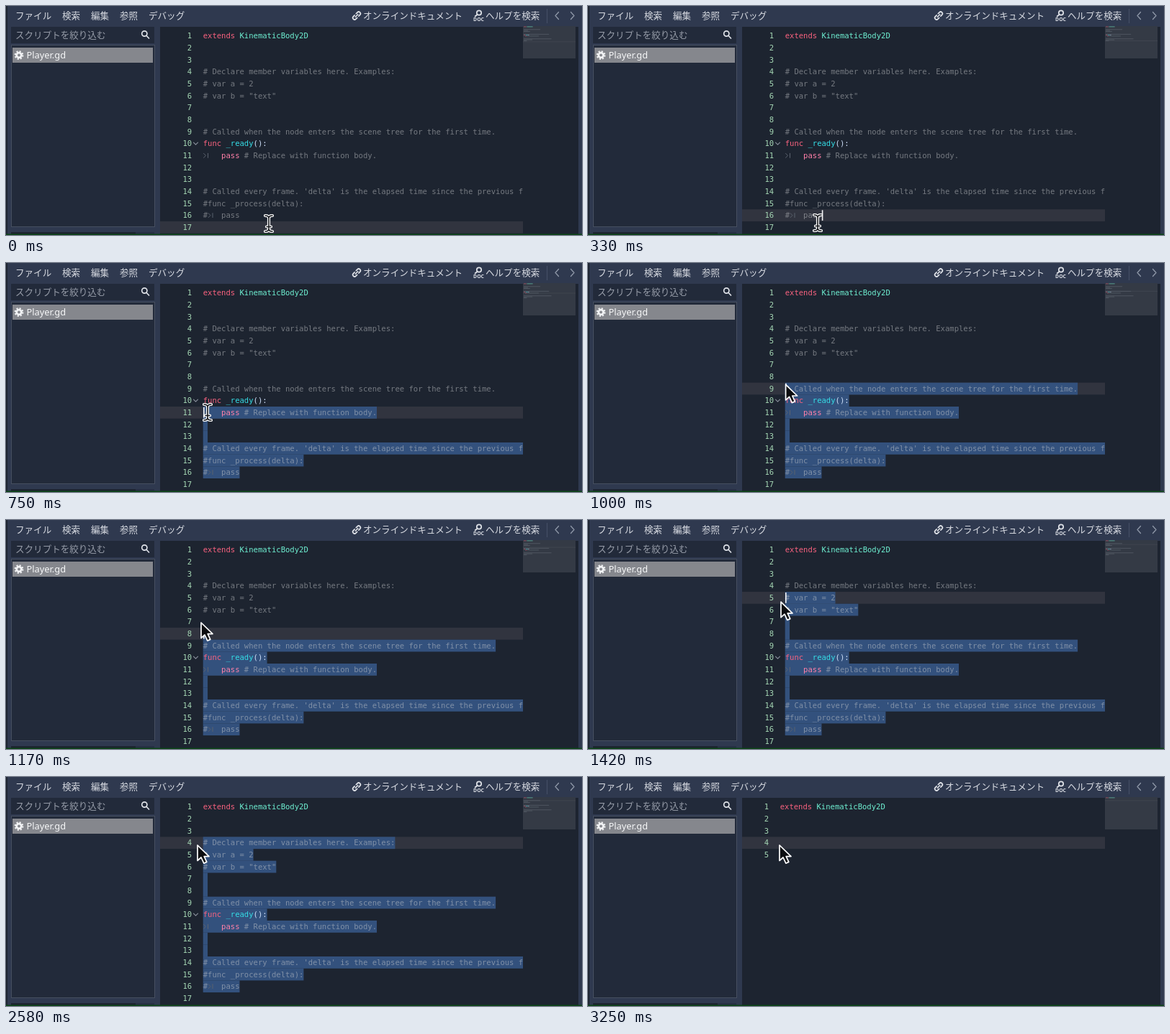
Write an HTML page that moves like this. It is 800x319 px and loops after 3550 ms.

```html
<!DOCTYPE html>
<html lang="ja">
<head>
<meta charset="utf-8">
<title>Script editor</title>
<style>
  html, body { margin: 0; width: 100%; height: 100%; overflow: hidden; background: #2f394f; }
  svg { display: block; width: 800px; height: 319px; }
  .ui { font: 12.55px "Noto Sans CJK JP", "Noto Sans CJK", "Noto Sans", sans-serif; fill: #d9dce3; }
  .code { font: 10.55px "DejaVu Sans Mono", monospace; white-space: pre; }
  .num { fill: #a5d7b4; text-anchor: end; }
  .key { fill: #f9627f; }
  .flow { fill: #ff80a8; }
  .type { fill: #6ff0d2; }
  .fn { fill: #35dde6; }
  .sym { fill: #cfe0fa; }
  .note { fill: rgba(205, 207, 210, .5); }
  .icon { fill: none; stroke: #dfe2e8; stroke-width: 1.7; stroke-linecap: round; stroke-linejoin: round; }
  .icon.nav { stroke: #8f98a8; stroke-width: 1.3; }
  .icon.fold { stroke: #868d99; stroke-width: 1.2; }
  .icon.tab { stroke: #5b626e; stroke-width: 1; }
</style>
</head>
<body>
<svg viewBox="0 0 800 319">
  <defs>
    <clipPath id="view"><rect x="214" y="29" width="504" height="289"/></clipPath>
    <path id="beamLine" d="M-5 -12Q0 -12 0 -8.5Q0 -12 5 -12M0 -8.5V6.5M-5 10Q0 10 0 6.5Q0 10 5 10M-3 3.5H3"/>
  </defs>
  <rect width="800" height="319" fill="#2f394f"/>
  <rect width="2" height="319" fill="#1d2430"/>

  <g class="ui">
    <text x="13" y="18">ファイル</text>
    <text x="78" y="18">検索</text>
    <text x="118" y="18">編集</text>
    <text x="158" y="18">参照</text>
    <text x="198" y="18">デバッグ</text>
    <text x="496" y="18">オンラインドキュメント</text>
    <text x="666" y="18">ヘルプを検索</text>
  </g>
  <path class="icon" transform="rotate(-45 487 13.5)"
    d="M485.5 11H483a2.5 2.5 0 0 0 0 5h2.5M488.5 11h2.5a2.5 2.5 0 0 1 0 5h-2.5M484.5 13.5h5"/>
  <g class="icon"><circle cx="657" cy="9.5" r="3.2"/><path d="M654.5 12l-3 2.5"/></g>
  <text x="656.5" y="21" text-anchor="middle" fill="#dfe2e8" font-family="Noto Sans, sans-serif" font-size="6.8" font-weight="800">DOC</text>
  <path class="icon nav" d="M767.5 8.5l-4.5 5 4.5 5M784.5 8.5l4.5 5-4.5 5"/>
  <path d="M751.5 4v20" stroke="#465067"/>

  <rect x="7" y="29" width="199" height="23" fill="#222a3a"/>
  <text class="ui" x="13" y="44.5" style="fill:#979da9">スクリプトを絞り込む</text>
  <g class="icon"><circle cx="192.3" cy="38.5" r="3.6"/><path d="M195.2 41.5l3.3 3.5"/></g>
  <rect x="7.5" y="54.5" width="199" height="253" fill="#222a3a" stroke="#464f60"/>
  <rect x="9" y="58" width="195" height="21" fill="#85878d"/>
  <g transform="translate(18 68.5)" fill="none" stroke="#f2f3f5">
    <circle r="3.3" stroke-width="2.8"/>
    <circle r="5.3" stroke-width="2.2" stroke-dasharray="2.1 2.062"/>
  </g>
  <text x="28.5" y="72.6" fill="#f6f7f8" font-family="Noto Sans, sans-serif" font-size="12.85">Player.gd</text>
  <rect x="7" y="315" width="173" height="3" fill="#1d2430"/>
  <rect x="180" y="315" width="26" height="3" fill="#273044"/>

  <rect x="214" y="29" width="581" height="289" fill="#1d2430"/>
  <g id="editor" clip-path="url(#view)"></g>
  <rect x="718" y="28" width="73" height="45" fill="#343a45"/>
  <g id="map"></g>
  <rect y="317.5" width="800" height="1.5" fill="#0b4516"/>

  <g id="beam" fill="none" stroke-linecap="round" stroke-linejoin="round">
    <use href="#beamLine" stroke="#fff" stroke-width="4.2"/>
    <use href="#beamLine" stroke="#15171c" stroke-width="1.6"/>
  </g>
  <path id="arrow" d="M0 0V21.5L5 17L8.8 25.2L12.8 23.4L9.2 15.6H16Z" fill="#0c0d10" stroke="#fff" stroke-width="1.7" stroke-linejoin="round"/>
</svg>
<script>
const LOOP = 3550, TICK = 1000 / 12;
const CHAR = 6.35, ROW = 16.66, TOP = 33.4;
const DELETE_AT = 33, POINT_AT = 12;
const ANCHOR = { row: 16, col: 8 };
const $ = id => document.getElementById(id);

// Each line is a list of [class, text] runs.
const note = text => [["note", text]];
const before = [
  [["key", "extends "], ["type", "KinematicBody2D"]], [], [],
  note("# Declare member variables here. Examples:"),
  note("# var a = 2"),
  note('# var b = "text"'), [], [],
  note("# Called when the node enters the scene tree for the first time."),
  [["key", "func "], ["fn", "_ready"], ["sym", "():"]],
  [["flow", "    pass "], ["note", "# Replace with function body."]], [], [],
  note("# Called every frame. 'delta' is the elapsed time since the previous f"),
  note("#func _process(delta):"),
  note("#   pass"), []
];
const after = before.slice(0, 3).concat([[], []]);
const length = line => line.reduce((n, run) => n + run[1].length, 0);

// tick, x, y
const mouse = [[0, 365, 304], [4, 319, 303], [5, 317, 299], [9, 280, 209], [14, 271, 143], [19, 266, 95]];
// tick, row, column
const carets = [[0, 17, 0], [3, 16, 8], [6, 15, 5], [7, 14, 3], [8, 12, 0], [9, 11, 0], [11, 10, 0],
  [12, 9, 0], [14, 8, 0], [15, 7, 0], [16, 6, 0], [17, 5, 0], [18, 4, 0]];
// ticks at which the caret shows, from and to
const shown = [[3, 26], [DELETE_AT, 38]];

const rowTop = row => TOP + (row - 1) * ROW;
const rect = (x, y, w, h, fill) => `<rect x="${x}" y="${y}" width="${w}" height="${h}" fill="${fill}"/>`;

function mouseAt(tick) {
  const i = mouse.findIndex(k => k[0] > tick);
  if (i < 0) return mouse[mouse.length - 1].slice(1);
  const [a, b] = [mouse[i - 1], mouse[i]];
  const p = (tick - a[0]) / (b[0] - a[0]);
  return [1, 2].map(n => a[n] + (b[n] - a[n]) * p);
}

function selection(row, col, left) {
  let out = "";
  for (let r = row; r <= ANCHOR.row; r++) {
    const from = r === row ? col : 0;
    const to = r === ANCHOR.row ? ANCHOR.col : Math.max(1, length(before[r - 1]));
    if (to > from) out += rect(left + from * CHAR, rowTop(r), (to - from) * CHAR, ROW + .1, "#33517d");
  }
  return out;
}

function tabMark(x, row) {
  const y = rowTop(row) + ROW / 2;
  return `<path class="icon tab" d="M${x} ${y - 3}l3 3-3 3M${x + 6} ${y - 3}v6"/>`;
}

function textLine(line, row, left) {
  const y = rowTop(row) + 12;
  const spans = line.map(([kind, text]) => `<tspan class="${kind}">${text}</tspan>`).join("");
  return `<text class="code num" x="${left - 15.5}" y="${y}">${row}</text>` +
    `<text class="code" x="${left}" y="${y}">${spans}</text>`;
}

function miniMap(lines, row) {
  const step = 1.3, unit = .55, top = 28.5;
  const tint = { key: "#a8566a", flow: "#a8566a", type: "#5fb5a4", fn: "#3d9ca4", sym: "#8997ab", note: "#555c67" };
  let out = rect(718, top + (row - 1) * step, 73, 1, "#3f444f");
  lines.forEach((line, i) => {
    let x = 719;
    for (const [kind, text] of line) {
      const pad = text.length - text.trimStart().length;
      out += rect(x + pad * unit, top + i * step, text.trim().length * unit, .8, tint[kind]);
      x += text.length * unit;
    }
  });
  return out;
}

function draw(tick) {
  const cut = tick >= DELETE_AT;
  const lines = cut ? after : before;
  const left = cut ? 266.7 : 273.7;
  const [, row, col] = carets.filter(k => k[0] <= tick).pop();
  let out = rect(214, rowTop(row), 504, ROW, "#31343f");
  if (!cut && row <= ANCHOR.row) out += selection(row, col, left);
  out += lines.map((line, i) => textLine(line, i + 1, left)).join("");
  if (!cut) {
    const y = rowTop(10) + ROW / 2;
    out += tabMark(274.5, 11) + tabMark(281, 16);
    out += `<path class="icon fold" d="M260.5 ${y - 1.5}l3 3 3-3"/>`;
  }
  if (shown.some(([a, b]) => tick >= a && tick < b))
    out += rect(left + col * CHAR + .3, rowTop(row) + 1, 1.6, ROW - 2, "#f4f5f7");
  $("editor").innerHTML = out;
  $("map").innerHTML = miniMap(lines, row);

  const [x, y] = mouseAt(tick);
  const pointing = tick >= POINT_AT;
  $("beam").style.display = pointing ? "none" : "";
  $("arrow").style.display = pointing ? "" : "none";
  for (const id of ["beam", "arrow"]) $(id).setAttribute("transform", `translate(${x} ${y})`);
}

const start = performance.now();
let last = -1;
function frame() {
  const t = (performance.now() - start) % LOOP;
  const tick = Math.floor((t + 4) / TICK);
  if (tick !== last) draw(last = tick);
  requestAnimationFrame(frame);
}
frame();
</script>
</body>
</html>
```
